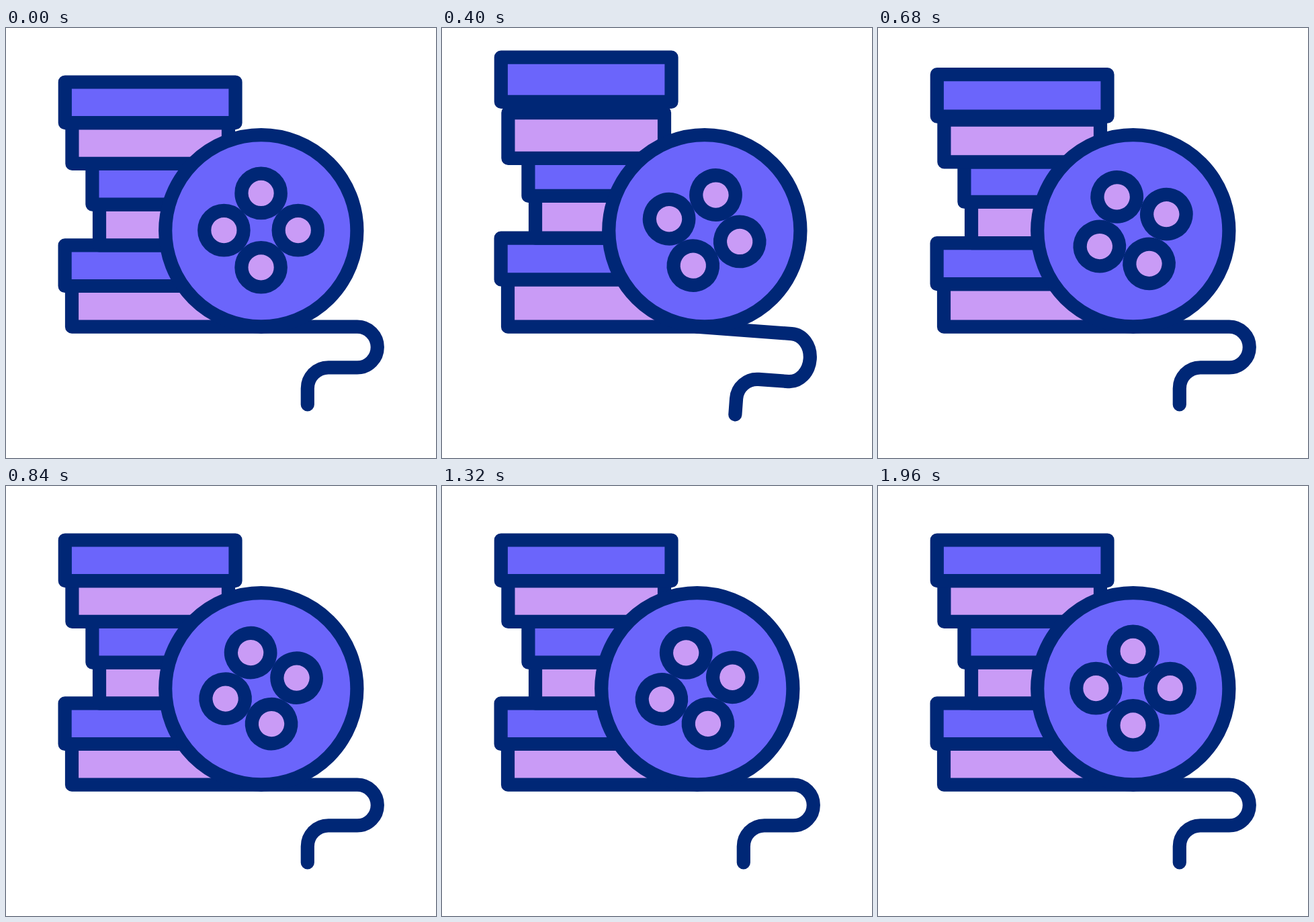
Write an HTML page that moves like this. It is 640 px wide and 640 px high and loops after 2000 ms.

```html
<!DOCTYPE html>
<html lang="en">
<head>
<meta charset="utf-8">
<title>Film reel</title>
<style>
  html, body { margin: 0; width: 100%; height: 100%; overflow: hidden; background: #fff; }
  svg { display: block; width: 100%; height: 100%; }
  .line { stroke: #002776; stroke-width: 20.2; stroke-linecap: round; stroke-linejoin: round; }
  .violet { fill: #6b65fb; }
  .pink { fill: #c99bf6; }
  .open { fill: none; }
</style>
</head>
<body>
<svg viewBox="0 0 640 640">
  <g id="stack"></g>
  <path id="film" class="line open"/>
  <g id="reel">
    <circle class="line violet" r="142.6"/>
    <g id="holes"></g>
  </g>
</svg>
<script>
const LOOP = 2000, STEP = 40;
const FLOOR = 444.7, ROW = 60.7, CENTER_X = 379.8, CENTER_Y = 301.7;
const $ = id => document.getElementById(id);

function add(parent, tag, attrs) {
  const el = document.createElementNS('http://www.w3.org/2000/svg', tag);
  for (const name in attrs) el.setAttribute(name, attrs[name]);
  return parent.appendChild(el);
}

// Boxes from the floor up; the lifts say how far each edge rises in the hop.
const boxes = [
  { left: 98, right: 380, lowLift: 0, topLift: 9.5 },
  { left: 87.6, right: 330, lowLift: 9.5, topLift: 10.5 },
  { left: 139, right: 330, lowLift: 10.5, topLift: 12.5 },
  { left: 128.4, right: 330, lowLift: 12.5, topLift: 8 },
  { left: 98.4, right: 331, lowLift: 8, topLift: 15 },
  { left: 87.8, right: 341.5, lowLift: 31, topLift: 36.5 }
];
boxes.forEach((box, i) => {
  box.el = add($('stack'), 'rect', {
    class: 'line ' + (i % 2 ? 'violet' : 'pink'), x: box.left, width: box.right - box.left
  });
});

for (let i = 0; i < 4; i++) {
  add($('holes'), 'circle', {
    class: 'line pink', r: 29.2, cy: -55.2, transform: `rotate(${i * 90})`
  });
}

// Cubic motion through { t, value, speed } keys; a key without speed is at rest.
function motion(keys, t) {
  if (t <= keys[0].t) return keys[0].value;
  const next = keys.findIndex(key => key.t > t);
  if (next < 0) return keys[keys.length - 1].value;
  const a = keys[next - 1], b = keys[next];
  const span = b.t - a.t, u = (t - a.t) / span, v = 1 - u;
  return a.value + (b.value - a.value) * u * u * (3 - 2 * u)
    + span * u * v * (v * (a.speed || 0) - u * (b.speed || 0));
}

const swayKeys = [{ t: 0, value: 0 }, { t: 180, value: -1.2 },
  { t: 360, value: 1.1 }, { t: 580, value: 0 }];
const hopKeys = [{ t: 280, value: 0 }, { t: 480, value: 1.56 }, { t: 760, value: 0 }];
const spinKeys = [{ t: 155, value: 0 }, { t: 680, value: 334.3, speed: 0.7 },
  { t: 1960, value: 720, speed: 0.165 }];

// The film tilts about the reel's foot while its loop opens.
function drawFilm(sway) {
  const gap = ROW + 10.5 * sway;
  $('film').setAttribute('d', `M0 0 H${143 - 2 * sway} a30 ${gap / 2} 0 0 1 0 ${gap}
    H${100 - 3 * sway} a31 31 0 0 0 -31 31 v24`);
  $('film').setAttribute('transform',
    `translate(${CENTER_X} ${FLOOR}) rotate(${4.2 * sway})`);
}

function draw(t) {
  const sway = motion(swayKeys, t), hop = motion(hopKeys, t);
  boxes.forEach((box, i) => {
    const top = FLOOR - ROW * (i + 1) - hop * box.topLift;
    const bottom = FLOOR - ROW * i - hop * box.lowLift;
    box.el.setAttribute('y', top);
    box.el.setAttribute('height', bottom - top);
  });
  drawFilm(sway);
  $('reel').setAttribute('transform',
    `translate(${CENTER_X + 11 * Math.max(0, sway)} ${CENTER_Y})`);
  $('holes').setAttribute('transform', `translate(-.2 -.6) rotate(${motion(spinKeys, t)})`);
}

const start = performance.now();
function tick() {
  const t = (performance.now() - start) % LOOP;
  draw(Math.floor(t / STEP) * STEP);
  requestAnimationFrame(tick);
}
tick();
</script>
</body>
</html>
```
